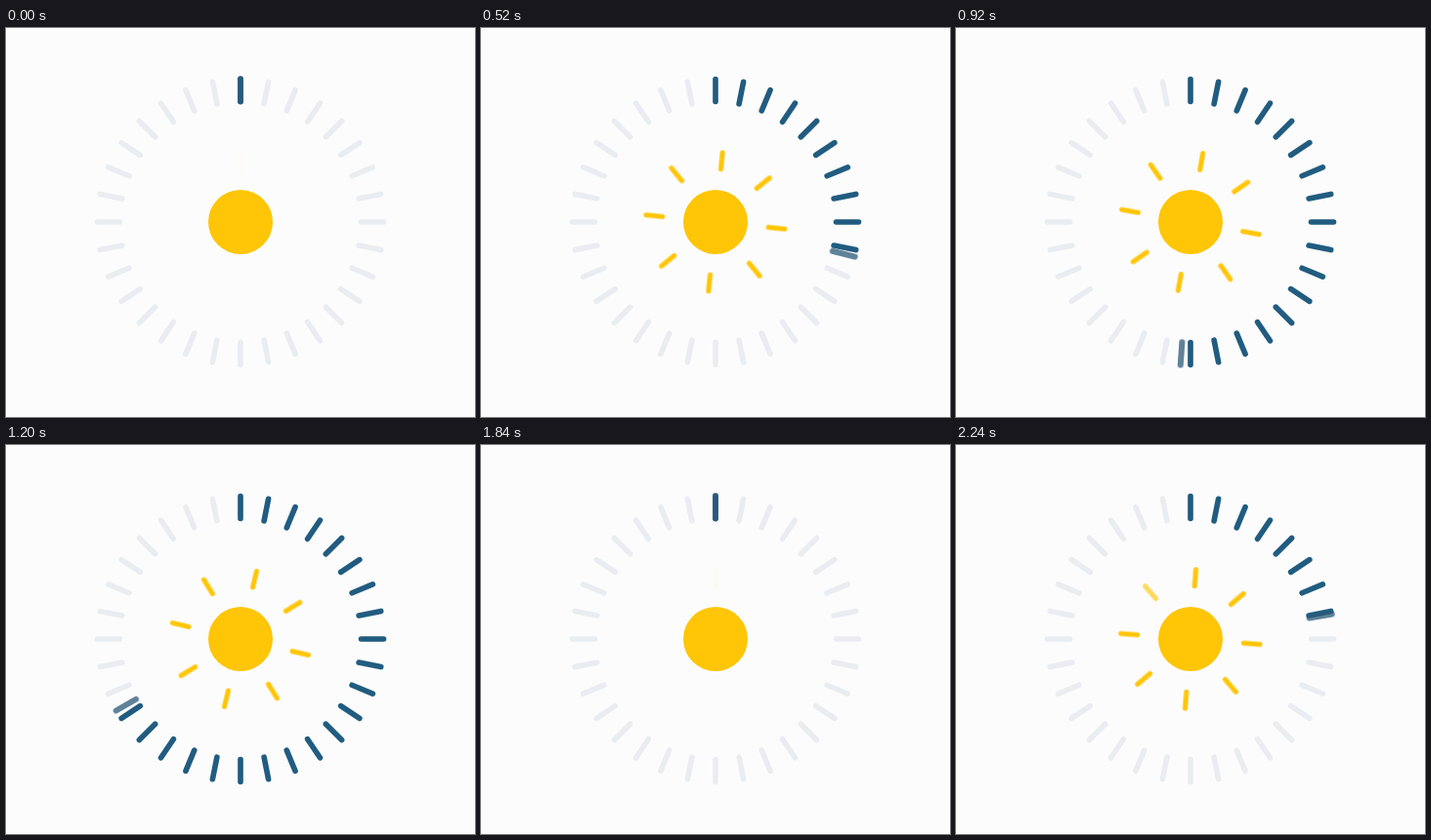
An HTML page without scripts for the animation above (2280 ms loop, 480 by 399 pixels).

```html
<!DOCTYPE html>
<html lang="en">
<head>
<meta charset="utf-8">
<title>Sun dial loader</title>
<style>
  html, body { margin: 0; width: 100%; height: 100%; overflow: hidden; background: #fcfcfc; }
  svg { display: block; width: 100%; height: 100%; }
  line { stroke-linecap: round; }

  /* One loop: a full 1800 ms turn, a 40 ms rest, then 440 ms of the next turn */
  .turn, .sweep, .first, .second { animation: 2280ms -2ms infinite; }
  .turn { animation-name: turn; }
  .hand { --full: 360deg; --part: 88deg; }
  .rays { --full: 20deg; --part: 4.889deg; }
  .sweep { animation-name: sweep; }
  .first { animation-name: first; --start: -2ms; }
  .second { animation-name: second; --start: 1838ms; }
  .rays use {
    animation: fade 2280ms linear infinite backwards;
    animation-delay: calc(var(--start) + var(--i) * 50ms);
  }

  @keyframes turn {
    0% { transform: rotate(0deg); animation-timing-function: steps(45); }
    78.947% { transform: rotate(var(--full)); animation-timing-function: step-start; }
    78.948%, 80.702% { transform: rotate(0deg); animation-timing-function: steps(11); }
    100% { transform: rotate(var(--part)); }
  }
  @keyframes sweep {
    0% { stroke-dashoffset: 31; animation-timing-function: steps(32); }
    78.947% { stroke-dashoffset: -1; animation-timing-function: step-start; }
    78.948%, 80.702% { stroke-dashoffset: 31; animation-timing-function: steps(8); }
    100% { stroke-dashoffset: 23; }
  }
  @keyframes first {
    0%, 78.947% { opacity: 1; }
    78.948%, 100% { opacity: 0; }
  }
  @keyframes second {
    0%, 80.701% { opacity: 0; }
    80.702%, 100% { opacity: 1; }
  }
  @keyframes fade {
    0% { opacity: 0; }
    3.5%, 80% { opacity: 1; }
    80.01%, 100% { opacity: 0; }
  }
</style>
</head>
<body>
<svg viewBox="0 0 480 399">
  <defs>
    <!-- Each group doubles the one before: 1 tick becomes 32 -->
    <line id="tick" y1="-146.5" y2="-123.5" stroke-width="5.6"/>
    <g id="t2"><use href="#tick"/><use href="#tick" transform="rotate(11.25)"/></g>
    <g id="t4"><use href="#t2"/><use href="#t2" transform="rotate(22.5)"/></g>
    <g id="t8"><use href="#t4"/><use href="#t4" transform="rotate(45)"/></g>
    <g id="t16"><use href="#t8"/><use href="#t8" transform="rotate(90)"/></g>
    <g id="ring"><use href="#t16"/><use href="#t16" transform="rotate(180)"/></g>

    <line id="ray" y1="-71.5" y2="-54.5" stroke-width="5"/>
    <g id="burst">
      <use href="#ray" style="--i:0"/>
      <use href="#ray" style="--i:1" transform="rotate(45)"/>
      <use href="#ray" style="--i:2" transform="rotate(90)"/>
      <use href="#ray" style="--i:3" transform="rotate(135)"/>
      <use href="#ray" style="--i:4" transform="rotate(180)"/>
      <use href="#ray" style="--i:5" transform="rotate(225)"/>
      <use href="#ray" style="--i:6" transform="rotate(270)"/>
      <use href="#ray" style="--i:7" transform="rotate(315)"/>
    </g>

    <mask id="passed" maskUnits="userSpaceOnUse" x="-160" y="-160" width="320" height="320">
      <circle class="sweep" r="135" pathLength="32" fill="none" stroke="#fff" stroke-width="40"
              stroke-dasharray="32 64" transform="rotate(-95.625)"/>
    </mask>
  </defs>

  <g transform="translate(240 199)">
    <use href="#ring" stroke="#e9edf1"/>
    <g mask="url(#passed)"><use href="#ring" stroke="#215c80"/></g>
    <g class="turn hand">
      <line y1="-147" y2="-123.5" stroke="#2c5a78" stroke-width="6" opacity=".75"/>
    </g>
    <g class="turn rays" stroke="#ffc507">
      <g class="first">
        <use href="#ray" style="--i:0"/>
        <use href="#ray" style="--i:1" transform="rotate(45)"/>
        <use href="#ray" style="--i:2" transform="rotate(90)"/>
        <use href="#ray" style="--i:3" transform="rotate(135)"/>
        <use href="#ray" style="--i:4" transform="rotate(180)"/>
        <use href="#ray" style="--i:5" transform="rotate(225)"/>
        <use href="#ray" style="--i:6" transform="rotate(270)"/>
        <use href="#ray" style="--i:7" transform="rotate(315)"/>
      </g>
      <g class="second">
        <use href="#ray" style="--i:0"/>
        <use href="#ray" style="--i:1" transform="rotate(45)"/>
        <use href="#ray" style="--i:2" transform="rotate(90)"/>
        <use href="#ray" style="--i:3" transform="rotate(135)"/>
        <use href="#ray" style="--i:4" transform="rotate(180)"/>
        <use href="#ray" style="--i:5" transform="rotate(225)"/>
        <use href="#ray" style="--i:6" transform="rotate(270)"/>
        <use href="#ray" style="--i:7" transform="rotate(315)"/>
      </g>
    </g>
    <circle r="33" fill="#ffc507"/>
  </g>
</svg>
</body>
</html>
```
